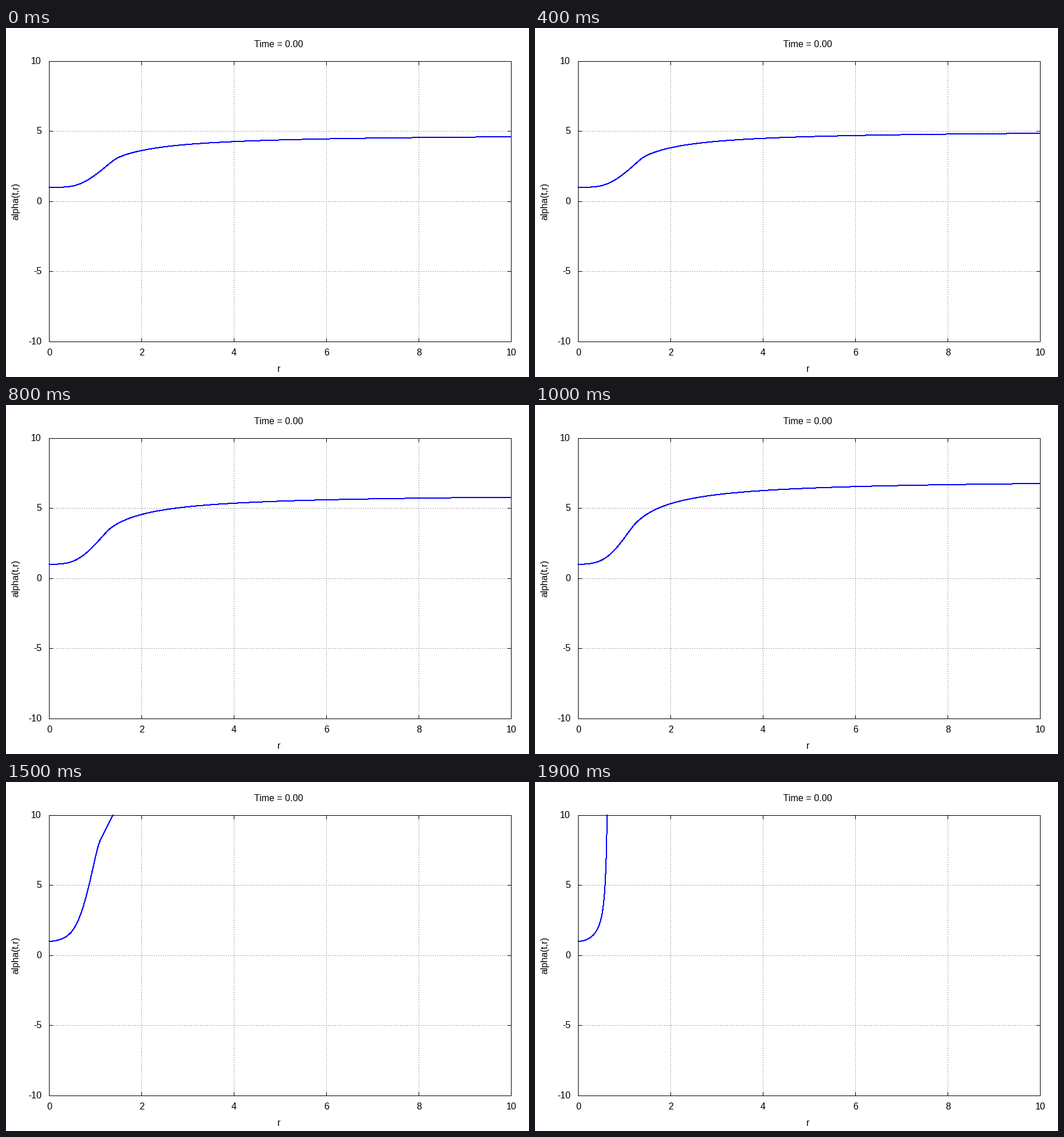
Write a matplotlib script that moves like this. It is 900 px wide and 600 px high and loops after 2 s.

```python
import numpy as np
import matplotlib.pyplot as plt
from matplotlib.animation import FuncAnimation

W, H, DPI = 900, 600, 100
FRAMES, STEP = 20, 100
LEFT, RIGHT, TOP, BOTTOM = 74, 869, 57, 539
TICK = 7
PX = 72 / DPI
TOP_VALUE = 10
HORIZON = 0.87      # twice the mass, sets the outer falloff
SPLIT, END = 7.5, 9.5

plt.rcParams["font.family"] = "Liberation Sans"
plt.rcParams["font.size"] = 16 * PX

R = np.linspace(0, 10, 1001)


def early(t):
    """Static exterior sqrt(1 - HORIZON / r) joined to a soft core."""
    s = t * t
    edge = np.exp(1.527 + s / (78 - 0.48 * s - 0.0016 * s * s))
    c2 = edge ** 2 / (1 - HORIZON / 10)

    u = t / SPLIT
    core = (HORIZON / (1 - 1 / c2)
            + 0.09 * u ** 2 * (1 - 0.83 * u ** 2) * R ** 2
            + (0.117 + 0.061 * u ** 4) * R ** (4 + 2 * u ** 3))
    join = 1.4 - 0.6 * u ** 2 + 0.3 * u ** 4
    w = 1 / (1 + np.exp((join - R) / (0.08 - 0.035 * u)))
    radius = core + (R - core) * w
    return R, np.sqrt(c2 * (1 - HORIZON / radius))


def late(t):
    """The front steepens: each value moves inwards to its last radius."""
    q = np.linspace(0, np.sqrt(np.log(10.5)), 300)
    a = np.exp(q * q)
    r0, a0 = early(SPLIT)
    start = np.interp(q, np.sqrt(np.log(np.maximum(a0, 1))), r0)
    x = 0.55 * q
    stop = x / (1 + (x / 0.695) ** 4) ** 0.25
    u = (t - SPLIT) / (END - SPLIT)
    w = 1 - (1 - u) ** (1 + 0.085 * (a - 1))
    return start + (stop - start) * w, a


def profile(t):
    r, a = early(t) if t <= SPLIT else late(t)
    if a.max() > TOP_VALUE:
        n = np.argmax(a > TOP_VALUE)
        cut = np.interp(TOP_VALUE, a[n - 1:n + 1], r[n - 1:n + 1])
        r, a = np.append(r[:n], cut), np.append(a[:n], TOP_VALUE)
    return LEFT + 79.5 * r, 298 - 24.1 * a


fig = plt.figure(figsize=(W / DPI, H / DPI), dpi=DPI, facecolor="white")
ax = fig.add_axes([0, 0, 1, 1])
ax.set_xlim(0, W)
ax.set_ylim(H, 0)
ax.axis("off")


def line(xs, ys, color="black", z=2, **kw):
    ax.plot(xs, ys, color=color, lw=PX, snap=False, zorder=z,
            solid_capstyle="butt", dash_capstyle="butt", **kw)


def hline(y, x0, x1, **kw):
    line([x0, x1 + 1], [y + .5, y + .5], **kw)


def vline(x, y0, y1, **kw):
    line([x + .5, x + .5], [y0, y1 + 1], **kw)


def label(x, y, s, ha="center", **kw):
    ax.text(x, y, s, ha=ha, va="baseline", color="black", **kw)


dots = dict(color="#a0a0a0", z=1, linestyle=(0, (2, 2)))

for i, x in enumerate(range(LEFT, RIGHT + 1, 159)):
    if LEFT < x < RIGHT:
        vline(x, TOP, BOTTOM, **dots)
        vline(x, TOP, TOP + TICK - 1)
        vline(x, BOTTOM - TICK + 1, BOTTOM)
    label(x + .5, 563, str(2 * i))

for value in range(-10, 11, 5):
    y = int(298 - 24.1 * value)
    if abs(value) < TOP_VALUE:
        hline(y, LEFT, RIGHT, **dots)
        hline(y, LEFT, LEFT + TICK - 1)
        hline(y, RIGHT - TICK + 1, RIGHT)
    label(61, y + 5, str(value), ha="right")

for y in (TOP, BOTTOM):
    hline(y, LEFT, RIGHT)
for x in (LEFT, RIGHT):
    vline(x, TOP, BOTTOM)

label(469, 33, "Time = 0.00")
label(469.5, 591, "r")
label(21, 298, "alpha(t,r)", rotation=90, rotation_mode="anchor")

# Without smoothing every touched pixel is filled, so 1 px draws as 2
curve, = ax.plot([], [], color="#0000ff", lw=PX, antialiased=False,
                 snap=False, solid_capstyle="butt", clip_on=False, zorder=3)


def update(i):
    curve.set_data(*profile(i / 2))
    return curve,


anim = FuncAnimation(fig, update, frames=FRAMES, interval=STEP,
                     init_func=lambda: update(0), repeat=True, repeat_delay=0)
plt.show()
```
